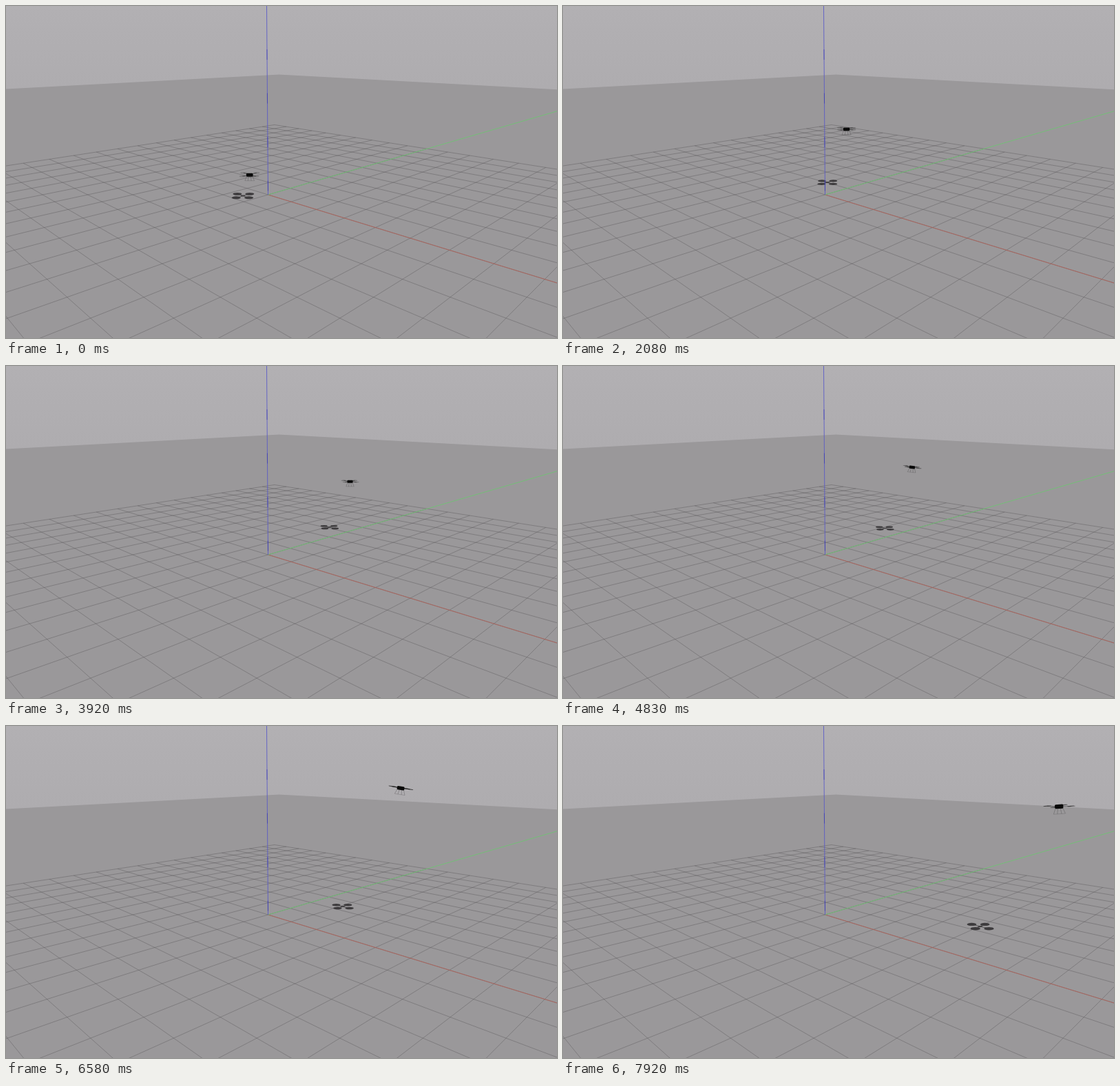
Animation of 800x482 px, one loop 8 s. Source, as an HTML page with a canvas:

```html
<!DOCTYPE html>
<html lang="en">
<head>
<meta charset="utf-8">
<title>Quadrotor flight</title>
<style>
  html, body { margin: 0; width: 100%; height: 100%; overflow: hidden; background: #9a989a; }
  canvas { display: block; width: 800px; height: 482px; }
</style>
</head>
<body>
<canvas id="stage" width="800" height="482"></canvas>
<script>
const ctx = document.getElementById('stage').getContext('2d');
const LOOP = 8000, FRAMES = 96;

// Pinhole camera looking along the grid diagonal; units are metres.
const FOCAL = 692.8, CAM_HEIGHT = 4.445, CAM_BACK = 14.308, CAM_SIDE = 0.421;
const PITCH = 0.2536, COS = Math.cos(PITCH), SIN = Math.sin(PITCH);

// Shadow shift per metre of height, in camera-aligned ground axes.
const SUN = { across: -0.3147, deep: 0.4716 };
const ARM = 0.195, BLADE = 0.14;
const corners = [[-1, 1], [1, 1], [-1, -1], [1, -1]];

// One waypoint per second: across, deep, height.
const waypoints = [
  [-0.535, -0.475, 0.77],
  [-0.77, -1.09, 1.75],
  [0.555, 0.355, 2],
  [1.97, 1.86, 1.775],
  [2.92, 2.69, 1.94],
  [2.97, 2.05, 2.605],
  [3.04, 0.05, 3.6],
  [4.285, -1.575, 3.99],
  [5.785, -2.94, 3.525]
];

function project(across, deep, height = 0) {
  const u = deep + CAM_BACK, v = CAM_HEIGHT - height;
  const scale = FOCAL / (u * COS + v * SIN);
  return { x: 400 + (across - CAM_SIDE) * scale, y: 241 + (v * COS - u * SIN) * scale, scale };
}

const world = (x, y, z) => project((x + y) * Math.SQRT1_2, (y - x) * Math.SQRT1_2, z);

// Smooth spline through the waypoints.
function positionAt(sec) {
  const last = waypoints.length - 1, i = Math.min(Math.floor(sec), last - 1), t = sec - i;
  const slope = (n, k) => {
    const from = Math.max(n - 1, 0), to = Math.min(n + 1, last);
    return (waypoints[to][k] - waypoints[from][k]) / (to - from);
  };
  return [0, 1, 2].map(k => {
    const a = waypoints[i][k], b = waypoints[i + 1][k];
    return a + (b - a) * t * t * (3 - 2 * t) +
      t * (1 - t) * ((1 - t) * slope(i, k) - t * slope(i + 1, k));
  });
}

function poseAt(sec) {
  const [across, deep, height] = positionAt(sec);
  const swing = 0.95 * (sec - 5.9);
  const roll = swing > -Math.PI / 2 ? 0.2 * Math.cos(swing) : 0;
  return { across, deep, height, roll };
}

function line(a, b, color, width = 1) {
  ctx.strokeStyle = color;
  ctx.lineWidth = width;
  ctx.beginPath();
  ctx.moveTo(a.x, a.y);
  ctx.lineTo(b.x, b.y);
  ctx.stroke();
}

function disc(p, rx, ry, color, angle = 0) {
  ctx.fillStyle = color;
  ctx.beginPath();
  ctx.ellipse(p.x, p.y, rx, ry, angle, 0, Math.PI * 2);
  ctx.fill();
}

function drawGround() {
  const sky = ctx.createLinearGradient(0, 0, 0, 122);
  sky.addColorStop(0, '#b2b0b3');
  sky.addColorStop(1, '#aeacaf');
  ctx.fillStyle = sky;
  ctx.fillRect(0, 0, 800, 482);

  const left = world(-50, -50), far = world(-50, 50), right = world(50, 50);
  ctx.fillStyle = '#9a989a';
  ctx.beginPath();
  ctx.moveTo(left.x, left.y);
  ctx.lineTo(far.x, far.y);
  ctx.lineTo(right.x, right.y);
  ctx.lineTo(right.x, 482);
  ctx.lineTo(left.x, 482);
  ctx.fill();

  const gridColor = 'rgba(84,82,84,.45)';
  for (let i = -10; i <= 10; i++) {
    line(world(i, -10), world(i, 10), gridColor, 0.9);
    line(world(-10, i), world(10, i), gridColor, 0.9);
  }
}

function drawAxes() {
  const origin = world(0, 0), top = world(0, 0, 8);
  line(origin, world(10, 0), 'rgba(180,96,86,.8)');
  line(origin, world(0, 40), 'rgba(112,194,116,.9)');
  line(origin, top, 'rgba(88,88,200,.85)');
  const onAxis = y => ({ x: origin.x + (top.x - origin.x) * (origin.y - y) / (origin.y - top.y), y });
  for (let y = 63; y < 270; y += 63.5) line(onAxis(y), onAxis(y + 15), 'rgba(40,40,170,.5)');
}

function drawShadow({ across, deep, height }) {
  const x = across + SUN.across * height, y = deep + SUN.deep * height;
  const color = '#3d3b3d', center = project(x, y);
  const spot = (dx, dy, r) => {
    const p = project(x + dx, y + dy);
    const ry = (project(x + dx, y + dy - r).y - project(x + dx, y + dy + r).y) / 2;
    disc(p, r * p.scale, ry, color);
  };
  for (const [sx, sy] of corners) {
    line(center, project(x + sx * ARM, y + sy * ARM), color, 0.7);
    spot(sx * ARM, sy * ARM, BLADE);
  }
  spot(0, 0, BLADE / 2);
}

function drawDrone({ across, deep, height, roll }) {
  const center = project(across, deep, height), s = center.scale;
  // Thin blades look solid edge-on and nearly vanish from above.
  const view = Math.max(0.06, (CAM_HEIGHT - height) / (deep + CAM_BACK));
  const blade = `rgba(22,22,22,${Math.min(0.75, 0.05 / view)})`;
  for (const [sx, sy] of corners) {
    const hub = project(across + sx * ARM, deep + sy * ARM, height - sx * ARM * Math.tan(roll) + 0.01);
    line(center, hub, 'rgba(20,20,20,.55)', 0.8);
    disc(hub, 0.1 * s, Math.max(0.65, 0.1 * s * view), blade, roll);
  }

  ctx.save();
  ctx.translate(center.x, center.y);
  ctx.rotate(roll);
  ctx.scale(s, s);
  for (const foot of [-0.14, -0.05, 0.05, 0.14])
    line({ x: foot * 0.6, y: 0.03 }, { x: foot, y: 0.175 }, 'rgba(60,58,60,.5)', 0.6 / s);
  line({ x: -0.14, y: 0.175 }, { x: 0.14, y: 0.175 }, 'rgba(60,58,60,.35)', 0.6 / s);
  ctx.fillStyle = '#090909';
  ctx.beginPath();
  ctx.roundRect(-0.1, -0.05, 0.2, 0.1, 0.025);
  ctx.fill();
  ctx.restore();
}

function render(now) {
  const step = LOOP / FRAMES;
  const frame = Math.floor((now % LOOP + 4) / step) % FRAMES;
  const pose = poseAt(frame * step / 1000);
  drawGround();
  drawShadow(pose);
  drawAxes();
  drawDrone(pose);
}

let start;
function tick(now) {
  start ??= now;
  render(now - start);
  requestAnimationFrame(tick);
}
render(0);
requestAnimationFrame(tick);
</script>
</body>
</html>
```
